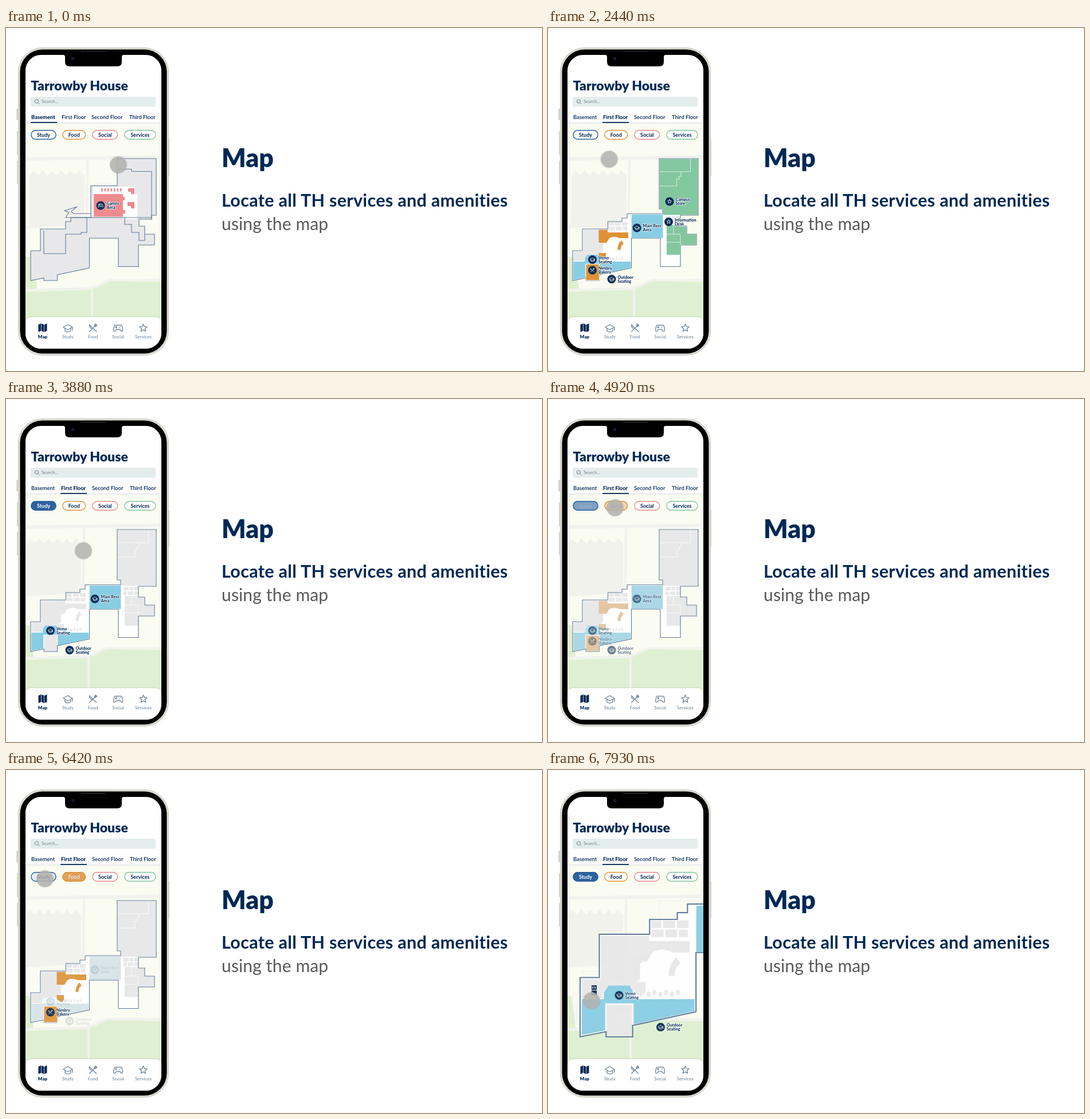
Write an HTML page that moves like this. It is 935 px wide and 599 px high and loops after 8 s.

```html
<!DOCTYPE html>
<html lang="en">
<head>
<meta charset="utf-8">
<title>Map</title>
<style>
html, body { margin: 0; width: 100%; height: 100%; overflow: hidden; background: #fff; }
svg { display: block; width: 100vw; height: 100vh; font-family: Lato, "Open Sans", sans-serif; }
text { fill: #002855; }
.head { font-weight: 900; }
.tabs text { font-size: 9.4px; font-weight: 600; }
.tabs .on { font-weight: 800; }
.chip text { font-size: 9px; font-weight: 700; text-anchor: middle; }
.pin text { font-size: 7.1px; font-weight: 800; paint-order: stroke; stroke: #fff; stroke-width: 1.6px; stroke-linejoin: round; }
.nav text { font-size: 8px; text-anchor: middle; fill: #74899a; font-weight: 500; }
.nav .on { fill: #002855; font-weight: 900; }
.icon { fill: none; stroke-linecap: round; stroke-linejoin: round; }
.wall { stroke: #5d7b98; stroke-width: 1.1; stroke-linejoin: miter; }
</style>
</head>
<body>
<svg id="stage" viewBox="0 0 935 599" xmlns="http://www.w3.org/2000/svg"></svg>
<script>
const NAVY = '#002855';
const GREY = '#e8e8e9';
const LOOP = 8000;

const rect = (x, y, w, h, fill, more = '') =>
  `<rect x="${x}" y="${y}" width="${w}" height="${h}" fill="${fill}" ${more}/>`;
const path = (d, fill, more = '') => `<path d="${d}" fill="${fill}" ${more}/>`;
const line = (d, stroke, width) => path(d, 'none', `stroke="${stroke}" stroke-width="${width}"`);
const text = (x, y, s, more = '') => `<text x="${x}" y="${y}" ${more}>${s}</text>`;
const group = (id, body, more = '') => `<g id="${id}" ${more}>${body}</g>`;
const repeat = (n, fn) => Array.from({ length: n }, (_, i) => fn(i)).join('');

// Icons live in a 16 px box around the origin.
const star = Array.from({ length: 10 }, (_, i) => {
  const a = i * Math.PI / 5, r = i % 2 ? 3.2 : 7;
  return `${(r * Math.sin(a)).toFixed(2)} ${(-r * Math.cos(a)).toFixed(2)}`;
}).join('L');
const icons = {
  cap: 'M-8 -1.5L0 -6L8 -1.5L0 3ZM-5 1V5Q0 8.5 5 5V1M8 -1.5V4',
  food: 'M-6 6L3 -3M3 -3Q2 -6 5 -7M3 -3Q6 -2 7 -5M3.5 -3.5L6 -6M6 6L-1 -.5L-6 -6Q-7 -2 -2.5 1',
  pad: 'M-5 -5H5Q7 -5 7.5 0L8 4Q7 7 4.5 4.5L3 2.5H-3L-4.5 4.5Q-7 7 -8 4L-7.5 0Q-7 -5 -5 -5ZM-3.5 -3V0M-5 -1.5H-2M2 -.7H2.1M4 -2.3H4.1',
  star: `M${star}Z`
};
const icon = (name, x, y, size, color, width) =>
  `<path class="icon" d="${icons[name]}" transform="translate(${x} ${y}) scale(${size})" stroke="${color}" stroke-width="${width}"/>`;

function pin(x, y, name, label) {
  const [top, bottom] = label.split('|');
  return `<g class="pin"><circle cx="${x}" cy="${y}" r="7.5" fill="#092b55"/>` +
    icon(name, x, y, .52, '#fff', 1.5) +
    text(x + 10.5, y - 1, top) + text(x + 10.5, y + 6.3, bottom) + '</g>';
}

// Map background
function ground() {
  const teeth = 'M41 258' + repeat(6, i => `l7 -9l4 5l5 ${i % 2 ? 5 : 3}`) +
    'V322Q136 338 120 342L60 347L40 347Z';
  const road = (d, w) => line(d, '#f1f2ee', w);
  return rect(20, 160, 270, 360, '#fafbf1') +
    path(teeth, '#f1f2ec') +
    path('M20 400H47L54 455L20 460Z', '#dff0d1') +
    path('M20 461L145 457Q160 454 172 446L182 442L290 443V520H20Z', '#dff0d2') +
    road('M20 229L290 225', 6) +
    road('M142 228L141 320Q140 340 120 343L20 349', 4) +
    road('M20 458L142 455Q157 453 170 445L182 440H290', 4) +
    road('M150 456V520', 4);
}

// First floor
const shell = 'M194 228H262V327H231V346H242V360H259V379H231V416.5H196V367H145.5V419L89.5 431V441H66V436.5L43 441V389H60V351H104.5V338H129V332H138V324.5H200V316H194Z';
const lounge = color => rect(145.8, 326, 54.5, 40.5, color);
const greens = color =>
  path('M195 229H261.3V326.3H201V315.5H195ZM207 344H230V347H241V360.5H258V378.5H231V396H207Z', color) +
  line('M248.5 229V251H195M232 251V259H228.5V264H224.5V276H195M207 360H231M219 344V360M207 374H231M231 361V379', '#ffffffcc', .9);
const foods = color =>
  path('M88.5 352.5H104V357H140V367H125Q115 362 107 367L102 375H88.5Z', color) +
  path('M121.5 387.5Q121 378 128 371L132 376.5Q126.5 380 126.5 387.5Z', color) +
  path('M88.5 393H101V401L97 406L88.5 400Z', color) +
  rect(66, 412.5, 23.3, 28.2, color, 'stroke="#fff" stroke-width=".8"');
const studies = lounge('#87cde4') +
  path('M44.5 408H64V402L68 396H87L90 402V405L95 408H144.2V418.3L90.5 430V411.5H65V435.5L44.5 439.4Z', '#87cde4');

// Two rows of small rooms with seeded widths
function smallRooms(left, right, top) {
  let out = '';
  for (let row = 0; row < 2; row++) {
    for (let x = left, seed = left + row; x < right - 5; seed++) {
      const w = Math.min(right - x, 6 + 5 * Math.abs(Math.sin(seed * 7)));
      out += rect(x, top + row * 8, w, 6.5, GREY);
      x += w + 1.5;
    }
  }
  return out;
}

const floorOne = path(shell, '#fff') +
  path('M61.5 352.5H104V362L99 366V374L96 377V390L88 397H67L63 403V407H44.5V390.5H61.5Z', GREY) +
  lounge('#e4e9ea') +
  path('M44.5 408H144.2V418.3L89 430.5L44.5 439.4Z', '#e3e9ea') +
  smallRooms(106, 139, 339) + smallRooms(205, 231, 328) +
  repeat(6, i => rect(102 + i * 5.2, 401.5 - i % 2 * 1.5, 3, 4, GREY)) +
  greens(GREY) + foods(GREY) + path(shell, 'none', 'class="wall"');

// Basement
function basement() {
  const pink = '#ee8b8e';
  return path('M148 275.5H194V228H262V327H254V334H232V346H242V360H259V379H231V416.5H196V367H145.5V419L89.5 431V441H66V436.5L43 441V389H60V351H104V338H113V331H148Z', '#e8e8ea', 'class="wall"') +
    path('M152 277H225V290H229V334H204V330H152Z', '#fff') +
    rect(153, 290, 51, 39.5, pink) +
    repeat(7, i => rect(166 + i * 5.5, 280, 2.6, 5.5, pink)) +
    path('M213 280H224V290H218V286H213ZM203 295H207V301H203ZM212 304H224V315H218V311H212ZM203 318H208V324H203Z', pink) +
    path('M194 246.5H219V250.5H254V334M148 324H117L114 320L124 312L102 319L110 322L104 331H254M66 354V394H104V360H131V357H141V331M207 331V343H219V357H232V371H242V360', 'none', 'class="wall"') +
    pin(165, 310, 'pad', 'Games|Area');
}

function tabs(active, xs) {
  const names = ['Basement', 'First Floor', 'Second Floor', 'Third Floor'];
  return names.map((s, i) => text(xs[i], 159, s, i === active ? 'class="on"' : '')).join('') +
    rect(xs[active] - 1, 164, 46, 1.8, NAVY);
}

const chips = [['Study', 44, 43, '#2d639d'], ['Food', 99, 39.5, '#dd953f'], ['Social', 151, 43.5, '#e58b90'], ['Services', 207, 54, '#83c59d']];
function chip([name, x, w, color], on) {
  const box = rect(x, 178.7, w, 15.6, on ? color : '#fff', `rx="7.8" stroke="${color}" stroke-width="1.4"`);
  return `<g class="chip">${box}${text(x + w / 2, 189.7, name, on ? 'style="fill:#fff"' : '')}</g>`;
}

function nav() {
  const items = [['Study', 'cap'], ['Food', 'food'], ['Social', 'pad'], ['Services', 'star']];
  return path('M34 575V516Q34 505 46 505H259Q271 505 271 516V575Z', '#fff', 'filter="url(#soft)"') +
    path('M56.5 518L61 516V529L56.5 531ZM61.7 516L66.3 518V531L61.7 529ZM67 518L71.5 516V529L67 531Z', NAVY) +
    text(64, 542, 'Map', 'class="on"') +
    items.map(([s, name], i) => {
      const x = 107.8 + i * 43.9;
      return icon(name, x, 524, 1, '#74899a', 1.4) + text(x, 542, s);
    }).join('');
}

const zoomed = '<g transform="matrix(1.972 0 0 1.99 -28.8 -411.6)"><use href="#plan"/><use href="#blue"/></g>' +
  rect(76, 376, 9, 8, '#092b55') + rect(76, 385, 9, 8, '#092b55') +
  line('M78 378V382M78 380H79.5M82 378V382M82 380H83.5M78 387V391H83', '#fff', 1) +
  pin(124, 393.5, 'cap', 'Vemo|Seating') + pin(196.5, 449, 'cap', 'Outdoor|Seating');

const mapView = group('ground', ground()) +
  group('normal',
    group('lower', basement()) +
    group('upper', '<use href="#plan"/>' +
      group('study', '<use href="#blue"/>') +
      group('food', foods('#de9236')) +
      group('service', greens('#83c79f') + pin(212, 303, 'star', 'Campus|Store') + pin(210.5, 338.5, 'star', 'Information|Desk')) +
      group('studyPins', pin(155, 349, 'cap', 'Main Rest|Area') + pin(77.5, 404.5, 'cap', 'Vemo|Seating') + pin(111, 438.5, 'cap', 'Outdoor|Seating')) +
      group('foodPins', pin(77.5, 423, 'food', 'Nimbry|Bakery')))) +
  group('zoom', zoomed);

const phone =
  rect(18, 141, 6, 20, '#d8d7cf', 'rx="1"') + rect(19, 180, 5, 42, '#d8d7cf', 'rx="1"') +
  rect(19, 232, 5, 41, '#d8d7cf', 'rx="1"') + rect(280, 194, 5, 65, '#d8d7cf', 'rx="1"') +
  rect(21.5, 34.5, 262, 537, '#dddcd4', 'rx="42" stroke="#c9c8c0"') +
  rect(24.5, 37.5, 256, 531, '#000', 'rx="39"');

const screen =
  rect(34, 47, 237, 513, '#fff') +
  `<g clip-path="url(#mapBox)">${mapView}</g>` +
  rect(34, 165.3, 237, 1, '#d5dade') +
  text(43.5, 109, 'Tarrowby House', 'class="head" font-size="23"') +
  rect(43, 120, 218, 17.5, '#e3edeb', 'rx="2.5"') +
  '<circle cx="53.5" cy="128" r="3.2" fill="none" stroke="#6e828d"/>' +
  line('M56 130.5L58.5 133', '#6e828d', 1) +
  text(62, 130.5, 'Search...', 'font-size="8" style="fill:#72858e"') +
  group('tabsLow', tabs(0, [44, 97, 149, 215]), 'class="tabs"') +
  group('tabsUp', tabs(1, [44, 96, 150, 216]), 'class="tabs"') +
  chips.map(c => chip(c)).join('') +
  group('studyOn', chip(chips[0], true)) + group('foodOn', chip(chips[1], true)) +
  group('nav', nav(), 'class="nav"') +
  group('cursor', '<circle r="15.7" fill="#777" opacity=".16"/><circle r="14.6" fill="#b3b3b0" opacity=".82"/>');

document.getElementById('stage').innerHTML =
  `<defs>
    <clipPath id="screenBox"><rect x="34" y="47" width="237" height="513" rx="27"/></clipPath>
    <clipPath id="mapBox"><rect x="34" y="166" width="237" height="352"/></clipPath>
    <filter id="soft" x="-10%" y="-20%" width="120%" height="140%"><feDropShadow dx="0" dy="-1" stdDeviation="1.5" flood-color="#567" flood-opacity=".16"/></filter>
    ${group('plan', floorOne)}${group('blue', studies)}
  </defs>` +
  phone + `<g clip-path="url(#screenBox)">${screen}</g>` +
  path('M100 40H205V47Q202 47 202 51V59Q202 67 194 67H111Q103 67 103 59V51Q103 47 100 47Z', '#000') +
  rect(131, 39.5, 43, 2.5, '#1d1d1f', 'rx="1.2"') + '<circle cx="116.5" cy="53.5" r="3" fill="#101b2c"/>' +
  text(376, 242.5, 'Map', 'class="head" font-size="44.5"') +
  text(376, 312, 'Locate all TH services and amenities', 'font-size="30.5" font-weight="700" letter-spacing=".3"') +
  text(376, 353, 'using the map', 'font-size="30" letter-spacing=".15" style="fill:#595959"');

// Motion
const FADE = 330;
const clamp = k => Math.max(0, Math.min(1, k));
const smooth = k => k * k * (3 - 2 * k);
const easeOut = k => Math.sin(k * Math.PI / 2);
const fade = (t, from) => smooth(clamp((t - from) / FADE));

const home = { x: 196, y: 239 };
const glides = [
  { from: 200, to: 900, x: 116, y: 160 },
  { from: 1240, to: 1600, x: 189, y: 272 },
  { from: 2150, to: 2730, x: 73, y: 187 },
  { from: 3300, to: 3700, x: 135, y: 265 },
  { from: 4040, to: 4400, x: 117, y: 190 },
  { from: 5070, to: 5400, x: 151, y: 253 },
  { from: 5650, to: 6000, x: 68, y: 190 },
  { from: 6500, to: 6900, x: 108, y: 417 },
  { from: 7150, to: 7450, x: 76, y: 403 }
];

// The finger swings sideways first, so x leads y.
function finger(t) {
  let { x, y } = home;
  for (const g of glides) {
    const k = clamp((t - g.from) / (g.to - g.from));
    x += (g.x - x) * easeOut(k);
    y += (g.y - y) * smooth(k);
  }
  return `${x} ${y}`;
}

const el = id => document.getElementById(id);
const show = (v, ...ids) => ids.forEach(id => el(id).setAttribute('opacity', v));

function draw(t) {
  const floor = fade(t, 1190);
  const filter = fade(t, 2840);
  const food = fade(t, 4780) * (1 - fade(t, 6350));
  const zoom = fade(t, 7650);

  show(1 - floor, 'lower', 'tabsLow');
  show(floor, 'upper', 'tabsUp');
  show(1 - food, 'study', 'studyPins');
  show(1 - filter + food, 'food', 'foodPins');
  show(1 - filter, 'service');
  show(filter * (1 - food), 'studyOn');
  show(food, 'foodOn');
  show(1 - zoom, 'normal');
  show(zoom, 'zoom');
  el('ground').setAttribute('transform', `translate(${-6 * filter} ${-5 * filter})`);
  el('cursor').setAttribute('transform', `translate(${finger(t)})`);
}

const start = performance.now();
function frame() {
  draw((performance.now() - start) % LOOP);
  requestAnimationFrame(frame);
}
frame();
</script>
</body>
</html>
```
